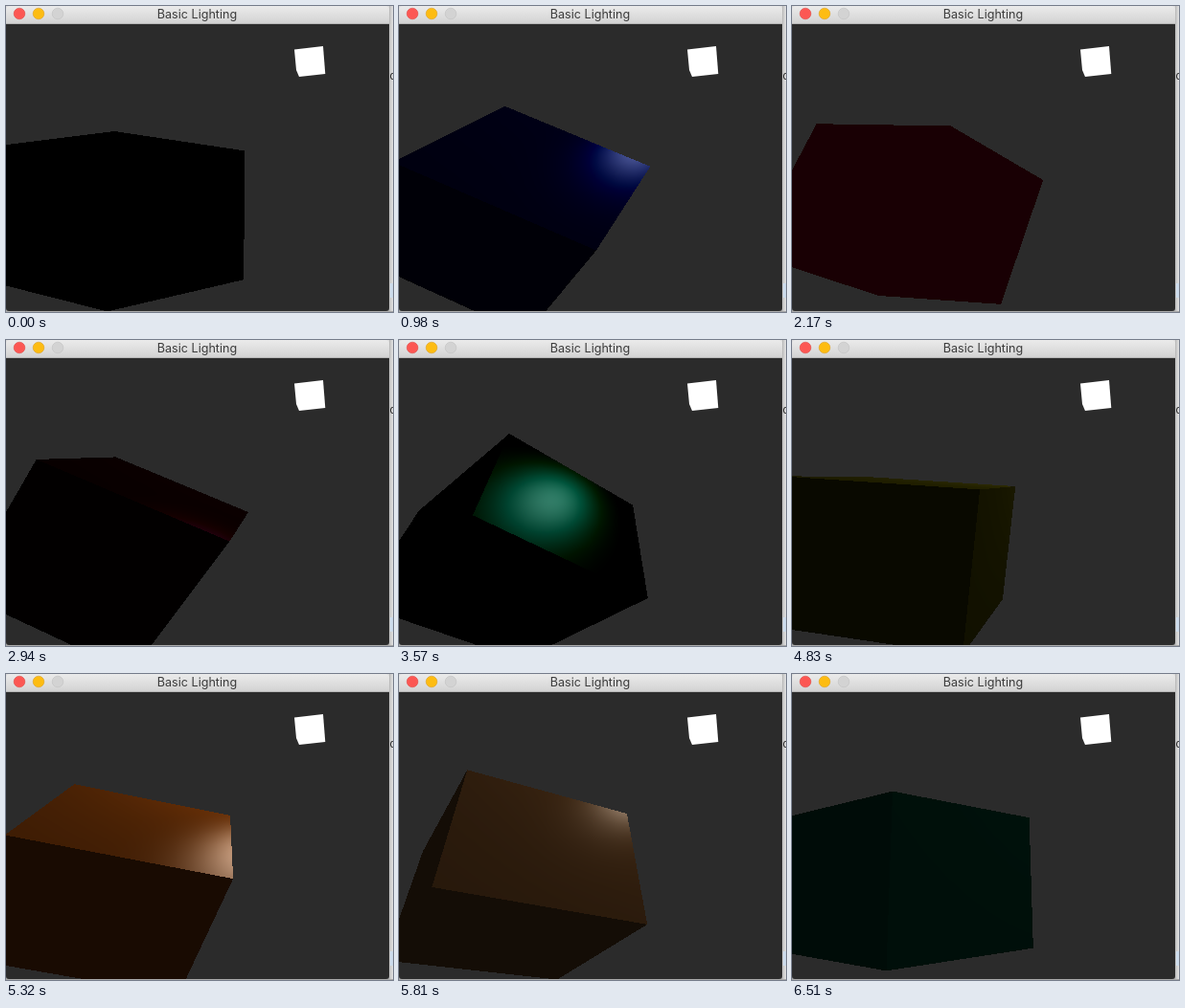
Write an HTML page with a canvas that moves like this. It is 404 by 320 pixels and loops after 6580 ms.

```html
<!DOCTYPE html>
<html lang="en">
<head>
<meta charset="utf-8">
<title>Basic Lighting</title>
<style>
  html, body { margin: 0; width: 404px; height: 320px; overflow: hidden; background: #dedede; }
  canvas, svg { position: absolute; left: 0; top: 0; display: block; }
  canvas { top: 19px; }
  text { font-family: Inter, Roboto, sans-serif; }
</style>
</head>
<body>
<canvas id="view" width="400" height="300"></canvas>
<svg width="404" height="320" viewBox="0 0 404 320">
  <defs>
    <linearGradient id="bar" x1="0" y1="0" x2="0" y2="1">
      <stop offset="0" stop-color="#ebebeb"/>
      <stop offset="1" stop-color="#d3d3d3"/>
    </linearGradient>
    <linearGradient id="side" x1="0" y1="0" x2="1" y2="0">
      <stop offset="0" stop-color="#b8b8b8"/>
      <stop offset="1" stop-color="#e6e6e6"/>
    </linearGradient>
  </defs>
  <rect x="400" width="4" height="320" fill="url(#side)"/>
  <rect x="401" y="290" width="3" height="15" fill="#cddcec"/>
  <text x="400.5" y="77" font-size="11" fill="#222">c</text>
  <rect y="319" width="404" height="1" fill="#a9a9a9"/>
  <path d="M0 18V4Q0 0 4 0H396Q400 0 400 4V18Z" fill="url(#bar)"/>
  <rect y="18" width="400" height="1" fill="#b4b4b4"/>
  <path d="M0 316V319H3Q0 319 0 316ZM400 316V319H397Q400 319 400 316Z" fill="#a9a9a9"/>
  <g stroke-width=".6">
    <circle cx="14" cy="8" r="5.8" fill="#fc5753" stroke="#df4744"/>
    <circle cx="34" cy="8" r="5.8" fill="#fdbc12" stroke="#de9f1f"/>
    <circle cx="54" cy="8" r="5.8" fill="#d3d3d3" stroke="#c2c2c2"/>
  </g>
  <text x="199.5" y="13" font-size="12.6" text-anchor="middle" fill="#3c3c3c">Basic Lighting</text>
  <path d="M301 45.5L331 42L333.3 71L306 74L303 67Z" fill="#fff"/>
</svg>
<script>
// View space: x right, y down, z forward.
const W = 400, H = 300, FX = 483, FY = 362;
const STEP = 70, STEPS = 94;
const RATE = 0.951, START = 14.44;
const BACKGROUND = 43, SHININESS = 32, SPECULAR = 127;
const MATERIAL = [1, 0.5, 0.31], PULSE = [2, 0.7, 1.3];

const dot = (a, b) => a[0] * b[0] + a[1] * b[1] + a[2] * b[2];
const scale = (a, s) => a.map(v => v * s);
const unit = a => scale(a, 1 / Math.hypot(...a));
const cross = (a, b) => [
  a[1] * b[2] - a[2] * b[1],
  a[2] * b[0] - a[0] * b[2],
  a[0] * b[1] - a[1] * b[0]
];

const center = [-0.431, 0.349, 2.64];
const light = [0.81, -1.03, 3.35];
const spin = unit([0.846, -0.4535, 0.28]);
const right = unit([0.636, 0.0745, 0.768]);
const down = unit(cross([-0.771, 0.0436, 0.634], right));
const axes = [right, cross(right, down), down];

function rotate(v, angle) {
  const c = Math.cos(angle), s = Math.sin(angle);
  const side = cross(spin, v), along = dot(spin, v) * (1 - c);
  return v.map((x, i) => x * c + side[i] * s + spin[i] * along);
}

const ctx = document.getElementById("view").getContext("2d");
const image = ctx.createImageData(W, H);
const data = image.data;

// Phong shading of one surface point, seen along ray.
function shade(at, point, normal, ray, ambient) {
  const toLight = unit(light.map((v, i) => v - point[i]));
  const facing = dot(normal, toLight);
  const diffuse = Math.max(facing, 0);
  const bounce = toLight.map((v, i) => v - 2 * facing * normal[i]);
  const glint = Math.max(dot(bounce, ray) / Math.hypot(...ray), 0);
  const shine = SPECULAR * glint ** SHININESS;
  for (let i = 0; i < 3; i++) data[at + i] = ambient[i] * (1 + 5 * diffuse) + shine;
}

function draw(seconds) {
  const turned = axes.map(a => rotate(a, RATE * seconds));
  const origin = turned.map(a => -dot(a, center));
  const clock = START + RATE * seconds;
  const ambient = MATERIAL.map((m, i) => 25.5 * m * Math.sin(PULSE[i] * clock));

  for (let y = 0, at = 0; y < H; y++) {
    for (let x = 0; x < W; x++, at += 4) {
      const ray = [(x + 0.5 - W / 2) / FX, (y + 0.5 - H / 2) / FY, 1];
      let near = -Infinity, far = Infinity, face = 0, sign = 1;
      for (let i = 0; i < 3; i++) {
        const speed = dot(turned[i], ray);
        const reach = 0.5 / Math.abs(speed), mid = -origin[i] / speed;
        if (mid - reach > near) {
          near = mid - reach;
          face = i;
          sign = -Math.sign(speed);
        }
        far = Math.min(far, mid + reach);
      }
      data[at + 3] = 255;
      if (near < far) {
        shade(at, scale(ray, near), scale(turned[face], sign), ray, ambient);
      } else {
        data[at] = data[at + 1] = data[at + 2] = BACKGROUND;
      }
    }
  }
  ctx.putImageData(image, 0, 0);
}

let shown = -1;
function tick() {
  const step = Math.floor(performance.now() / STEP) % STEPS;
  if (step !== shown) {
    shown = step;
    draw(step * STEP / 1000);
  }
  requestAnimationFrame(tick);
}
tick();
</script>
</body>
</html>
```
